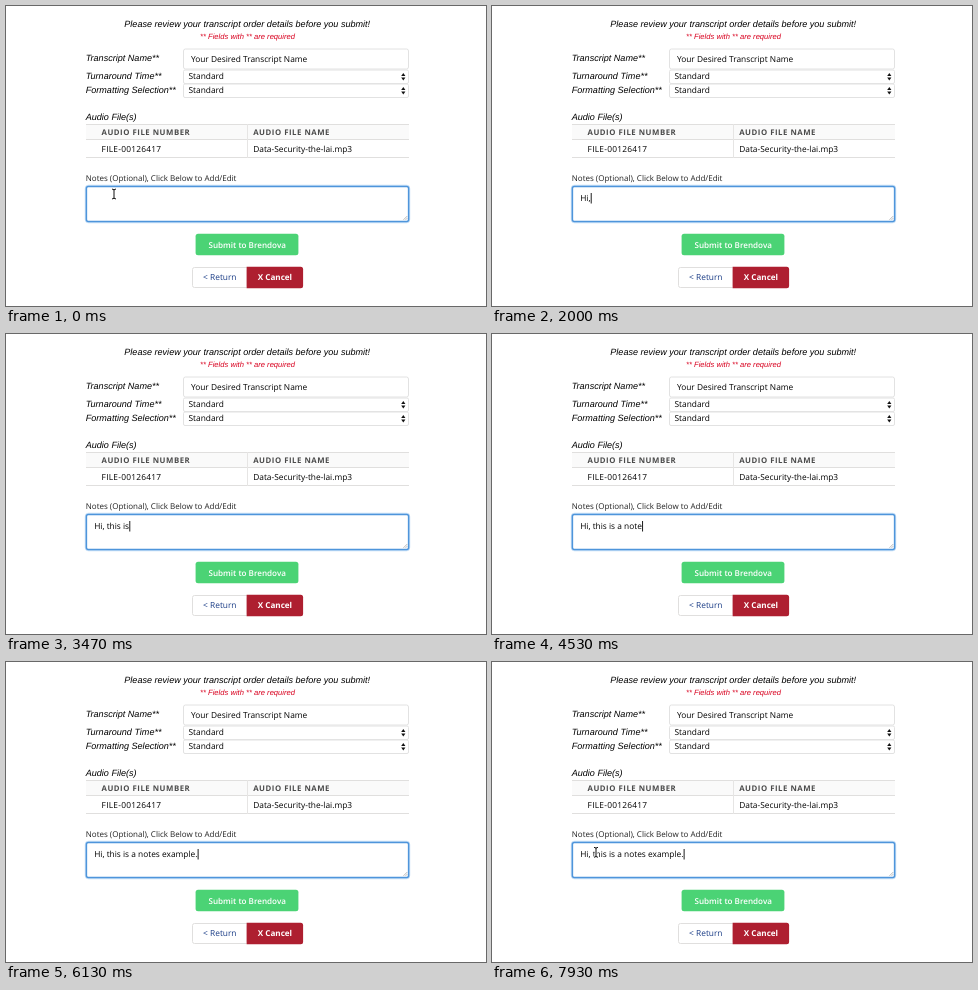
Animation, 480 px wide and 300 px high, one loop 8 s. Source, as an HTML page with a canvas:

```html
<!DOCTYPE html>
<html lang="en">
<head>
<meta charset="utf-8">
<title>Transcript order form</title>
<style>
html, body { margin: 0; width: 100%; height: 100%; overflow: hidden; background: #fff; }
canvas { display: block; width: 480px; height: 300px; }
</style>
</head>
<body>
<canvas id="stage"></canvas>
<script>
const LOOP = 8000;
const SANS = '"Open Sans", "Noto Sans", sans-serif';
const ARIAL = '"Liberation Sans", Arial, sans-serif';
const BODY = `8.35px ${SANS}`;
const BOLD = `600 8.1px ${SANS}`;
const HEAD = `700 7.8px ${SANS}`;
const LABEL = `italic 9.07px ${ARIAL}`;

const NOTE = "Hi, this is a notes example.";
// Time at which each character of NOTE is typed
const KEYS = [
  1600, 1670, 1870, 2330, 2530, 2670, 2800, 2930, 3070, 3270,
  3470, 3600, 3730, 3870, 4000, 4130, 4270, 4470, 4730, 4870,
  5070, 5200, 5330, 5530, 5670, 5730, 5800, 5930
];
// Spans in which the caret is visible
const CARET = [[470, 1070], [1600, 6440], [6970, 7470], [7900, LOOP]];

const canvas = document.getElementById("stage");
const ctx = canvas.getContext("2d");
const dpr = window.devicePixelRatio || 1;
canvas.width = 480 * dpr;
canvas.height = 300 * dpr;
ctx.scale(dpr, dpr);
ctx.textRendering = "geometricPrecision";

function text(str, x, y, font, color = "#000", align = "left", spacing = 0) {
  ctx.font = font;
  ctx.letterSpacing = spacing + "px";
  ctx.textAlign = align;
  ctx.fillStyle = color;
  ctx.fillText(str, x, y);
}

function line(x1, y1, x2, y2, color, width = 1) {
  ctx.strokeStyle = color;
  ctx.lineWidth = width;
  ctx.beginPath();
  ctx.moveTo(x1, y1);
  ctx.lineTo(x2, y2);
  ctx.stroke();
}

function box(x, y, w, h, { r = 0, fill, stroke, width = 1 }) {
  ctx.beginPath();
  ctx.roundRect(x, y, w, h, r);
  if (fill) {
    ctx.fillStyle = fill;
    ctx.fill();
  }
  if (stroke) {
    ctx.strokeStyle = stroke;
    ctx.lineWidth = width;
    ctx.stroke();
  }
}

function arrow(x, y, dy) {
  ctx.fillStyle = "#111";
  ctx.beginPath();
  ctx.moveTo(x - 2.1, y);
  ctx.lineTo(x + 2.1, y);
  ctx.lineTo(x, y + dy);
  ctx.fill();
}

function select(label, y) {
  text(label, 79.7, y + 9, LABEL);
  box(177.5, y, 225, 13.5, { r: 1.5, stroke: "#e2e2e2" });
  text("Standard", 182.5, y + 9, BODY);
  arrow(397.3, y + 6, -3);
  arrow(397.3, y + 7.6, 3);
}

function drawFields() {
  text("Please review your transcript order details before you submit!", 241.2, 20.5, LABEL, "#000", "center");
  text("** Fields with ** are required", 241.5, 32.9, `italic 7.6px ${ARIAL}`, "#d8001f", "center");
  text("Transcript Name**", 79.7, 55, LABEL);
  box(177.5, 43, 225, 20, { r: 2, stroke: "#e2e2e2" });
  text("Your Desired Transcript Name", 184.9, 55.5, BODY);
  select("Turnaround Time**", 64);
  select("Formatting Selection**", 78);
}

function drawTable() {
  text("Audio File(s)", 79.7, 113.8, LABEL);
  box(80, 118, 323, 16, { fill: "#fafafa" });
  for (const y of [118.5, 133.5, 151.5]) line(80, y, 403, y, "#e0dfde");
  line(241.5, 118, 241.5, 152, "#e6e5e4");
  text("AUDIO FILE NUMBER", 95.5, 128.9, HEAD, "#4a4a4a", "left", 0.52);
  text("AUDIO FILE NAME", 247.2, 128.9, HEAD, "#4a4a4a", "left", 0.52);
  text("FILE-00126417", 95.6, 145.5, BODY, "#000", "left", 0.25);
  text("Data-Security-the-lai.mp3", 247.2, 145.5, BODY);
}

function drawButtons() {
  box(189.6, 227.7, 102.8, 21.6, { r: 2.5, fill: "#4bd375" });
  text("Submit to Brendova", 241.2, 241.5, BOLD, "#fff", "center");
  box(186.5, 261.5, 56, 20, { r: 2, fill: "#fff", stroke: "#e0dfde" });
  text("< Return", 213.8, 274.4, BODY, "#1a3c86", "center");
  box(240.6, 260.7, 56.5, 21.5, { r: [0, 2.5, 2.5, 0], fill: "#ae1f30" });
  text("X Cancel", 268.9, 274.4, `700 8.1px ${SANS}`, "#fff", "center");
}

function drawNote(t) {
  text("Notes (Optional), Click Below to Add/Edit", 79.8, 175.4, `8px ${SANS}`, "#222");
  box(80.3, 180.3, 322.4, 35.4, { r: 2.5, stroke: "rgba(90,160,230,0.35)", width: 3 });
  box(80.4, 180.4, 322.2, 35.2, { r: 2, fill: "#fff", stroke: "#4e95db", width: 1.5 });
  line(397.5, 213.8, 401.2, 210.1, "#888", 0.6);
  line(399.6, 213.8, 401.2, 212.2, "#888", 0.6);

  const typed = NOTE.slice(0, KEYS.filter(k => k <= t).length);
  text(typed, 88.2, 194.8, BODY);
  if (CARET.some(([on, off]) => t >= on && t < off)) {
    const x = 88.9 + ctx.measureText(typed).width;
    line(x, 187, x, 197.5, "#000", 0.9);
  }
}

function drawPointer(x, y) {
  for (const [color, width] of [["#fff", 2.4], ["#111", 1]]) {
    line(x, y - 4.5, x, y + 4.5, color, width);
    for (const s of [-1, 1]) {
      line(x - 2, y + s * 5, x, y + s * 4.2, color, width);
      line(x + 2, y + s * 5, x, y + s * 4.2, color, width);
    }
  }
}

function draw(t) {
  ctx.fillStyle = "#fff";
  ctx.fillRect(0, 0, 480, 300);
  drawFields();
  drawTable();
  drawButtons();
  drawNote(t);
  if (t < 800) drawPointer(108, 188);
  if (t >= 7670) {
    const p = Math.min(1, (t - 7670) / 250);
    drawPointer(108 - 4 * p, 188 + 2.3 * p);
  }
}

const start = performance.now();
function tick() {
  draw((performance.now() - start) % LOOP);
  requestAnimationFrame(tick);
}
tick();
</script>
</body>
</html>
```
